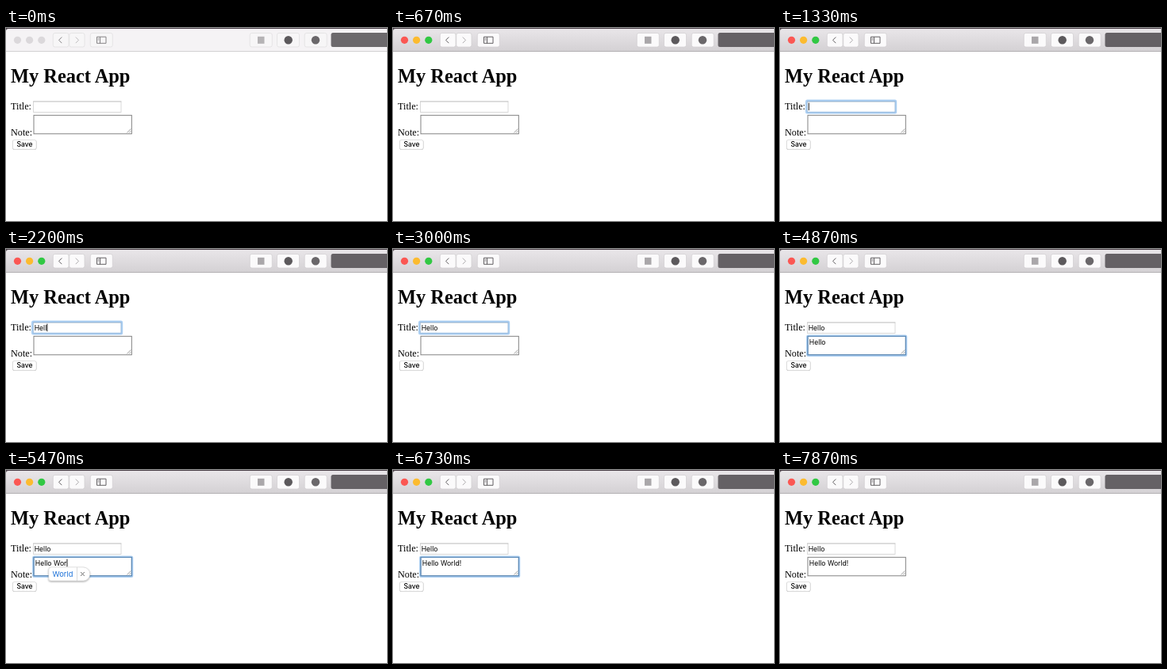
Write an HTML page that moves like this. It is 480 px wide and 244 px high and loops after 8000 ms.

```html
<!DOCTYPE html>
<html lang="en">
<head>
<meta charset="utf-8">
<title>My React App</title>
<style>
  html, body { margin: 0; width: 100%; height: 100%; overflow: hidden; background: #fff; }
  svg { display: block; width: 480px; height: 244px; }
  text { white-space: pre; }
  .serif { font: 12.2px "Liberation Serif", Times, serif; }
  .h1 { font-weight: bold; font-size: 24.4px; }
  .ui { font: 8.6px Inter, "Liberation Sans", sans-serif; }
  .btn { fill: #fbfafb; stroke: #d0cdd0; stroke-width: .7; }
  .icon { fill: none; stroke: #625f62; stroke-width: 1; }
  .ring { fill: none; stroke: #69a8e8; }
  .off .btn { fill: #f7f6f7; stroke: #dfdddf; }
  .off .icon { stroke: #858385; }
</style>
</head>
<body>
<svg viewBox="0 0 480 244">
  <defs>
    <linearGradient id="bar" x2="0" y2="1">
      <stop stop-color="#e9e6e9"/><stop offset="1" stop-color="#d4d1d4"/>
    </linearGradient>
    <linearGradient id="press" x2="0" y2="1">
      <stop stop-color="#6cb3fa"/><stop offset="1" stop-color="#0b6bf0"/>
    </linearGradient>
    <filter id="shadow" x="-20%" y="-30%" width="140%" height="180%">
      <feDropShadow dx="0" dy="1" stdDeviation="1.3" flood-opacity=".4"/>
    </filter>
  </defs>

  <rect width="480" height="244" fill="#fff"/>
  <g id="chrome">
    <rect width="480" height="4" fill="#4a3f48"/>
    <path id="toolbar" d="M0 29V4Q0 1 3 1H480V29Z"/>
    <path id="edge" d="M0 29.5H480"/>
    <g id="lights">
      <circle cx="14.5" cy="15.3" r="4.6"/>
      <circle cx="29.6" cy="15.3" r="4.6"/>
      <circle cx="44.8" cy="15.3" r="4.6"/>
    </g>
    <g id="buttons"></g>
    <path class="icon" d="M70.3 11.5L66.6 15.3L70.3 19.1" stroke-width="1.1"/>
    <path class="icon" d="M87.8 11.5L91.5 15.3L87.8 19.1" opacity=".5"/>
    <path class="icon" d="M114.5 11.2H126V19.3H114.5ZM118.5 11.2V19.3M115.8 13.2H117.2M115.8 15H117.2"/>
    <rect id="mark1" x="317" y="10.8" width="8.5" height="9" fill="#aaa7aa"/>
    <circle cx="355.7" cy="15.3" r="5.2" fill="#5c595c"/>
    <circle cx="390" cy="15.3" r="5.2" fill="#6a676a"/>
    <path id="address" d="M480 6H412Q409.5 6 409.5 8.5V21.5Q409.5 24 412 24H480Z"/>
  </g>

  <text class="serif h1" x="6" y="68.5">My React App</text>
  <text class="serif" x="6" y="103">Title:</text>
  <text class="serif" x="6" y="135.6">Note:</text>

  <rect x="34.5" y="93" width="110.5" height="13.5" fill="#fff" stroke="#cfcfcf" stroke-width=".8"/>
  <path d="M34.2 92.9H145.3" stroke="#b4b4b4" stroke-width=".6"/>
  <g id="titleRing" class="ring">
    <rect x="33.3" y="91.9" width="112.6" height="15.2" rx="1.2" stroke-width="2.6" opacity=".55"/>
  </g>
  <text id="title" class="ui" x="35.7" y="102.6"></text>

  <rect x="35" y="110.3" width="123.3" height="23.5" fill="#fff" stroke="#767676" stroke-width=".9"/>
  <path d="M152.3 132.5L157.3 127.5M155 132.5L157.3 130.2" stroke="#777" stroke-width=".7"/>
  <g id="noteRing" class="ring">
    <rect x="34.4" y="109.7" width="124.6" height="24.9" rx="1.2" stroke-width="2.6" opacity=".55"/>
    <rect x="35" y="110.3" width="123.3" height="23.5" stroke="#5685b5" stroke-width=".8"/>
  </g>
  <text id="note" class="ui" x="36.8" y="120.6"></text>
  <path id="caret" d="M0 0V9.6" stroke="#000" stroke-width=".9"/>

  <rect x="8" y="141.4" width="30.5" height="12.6" rx="2.8" fill="#bdbdbd"/>
  <rect id="saveFace" x="8.4" y="141.4" width="29.7" height="12" rx="2.5" stroke="#d2d2d2" stroke-width=".5"/>
  <text id="saveText" class="ui" x="13.4" y="150.4" style="font-weight:500">Save</text>

  <g id="popup">
    <path d="M57 122.9H97.2A8.6 8.6 0 0 1 97.2 140.1H57Q53.8 140.1 53.8 136.9V126.1Q53.8 122.9 57 122.9Z" fill="#fff" stroke="#bbb" stroke-width=".4" filter="url(#shadow)"/>
    <path d="M89.5 123V140" stroke="#d2d2d2" stroke-width=".8"/>
    <text class="ui" x="58.6" y="135" fill="#1a70d8" style="font-size:9.3px">World</text>
    <path d="M94.2 129.2L98.8 133.8M98.8 129.2L94.2 133.8" stroke="#666" stroke-width="1"/>
  </g>
</svg>
<script>
const LOOP = 8000;
const $ = id => document.getElementById(id);
const set = (id, attrs) => {
  for (const k in attrs) $(id).setAttribute(k, attrs[k]);
};

const ACTIVE = 670;
const PRESS = [6930, 7070];
const POPUP = [5465, 5690];
const fields = [
  { id: 'title', ring: 'titleRing', x: 35.7, y: 94.6, from: 970, to: 3070,
    text: 'Hello', keys: [1600, 1800, 2000, 2170, 2370] },
  { id: 'note', ring: 'noteRing', x: 36.8, y: 112.6, from: 3070, to: 6930,
    text: 'Hello World!',
    keys: [3400, 3530, 3700, 3900, 4110, 4370, 5060, 5230, 5390, 5720, 5900, 6200] }
];

$('buttons').innerHTML = [[59.3, 19.7], [79.8, 19.2], [106.3, 28], [307.3, 28], [341.5, 28], [376.2, 28]]
  .map(([x, w]) => `<rect class="btn" x="${x}" y="6.4" width="${w}" height="17.6" rx="2.4"/>`)
  .join('');

const within = (t, [a, b]) => t >= a && t < b;
const ramp = (t, start, length) => Math.min(1, Math.max(0, (t - start) / length));

function paintChrome(on) {
  $('chrome').setAttribute('class', on ? '' : 'off');
  set('toolbar', { fill: on ? 'url(#bar)' : '#f5f3f5' });
  set('edge', { stroke: on ? '#b3b0b3' : '#d2d0d2' });
  set('address', { fill: on ? '#656165' : '#6c696c' });
  set('mark1', { opacity: on ? 1 : .85 });
  const colors = on ? ['#fb5753', '#fcbb2f', '#31c843'] : Array(3).fill('#dbd8db');
  [...$('lights').children].forEach((c, i) => c.setAttribute('fill', colors[i]));
}

function paintField(f, t) {
  const count = f.keys.filter(k => k <= t).length;
  const el = $(f.id);
  el.textContent = f.text.slice(0, count);
  set(f.ring, { opacity: ramp(t, f.from, 100) * (1 - ramp(t, f.to, 100)) });
  if (!within(t, [f.from, f.to])) return false;
  // The blink restarts with each key
  const since = t - (count ? f.keys[count - 1] : f.from);
  const x = f.x + (count ? el.getComputedTextLength() : 0) + .6;
  set('caret', { transform: `translate(${x} ${f.y})` });
  return since % 1000 < 500;
}

function paint(t) {
  paintChrome(t >= ACTIVE);
  const caret = fields.map(f => paintField(f, t)).some(Boolean);
  set('caret', { opacity: +caret });
  set('popup', { opacity: +within(t, POPUP) });
  const down = within(t, PRESS);
  set('saveFace', { fill: down ? 'url(#press)' : '#fff' });
  set('saveText', { fill: down ? '#fff' : '#000' });
}

const start = performance.now();
function frame() {
  paint((performance.now() - start) % LOOP);
  requestAnimationFrame(frame);
}
frame();
</script>
</body>
</html>
```
